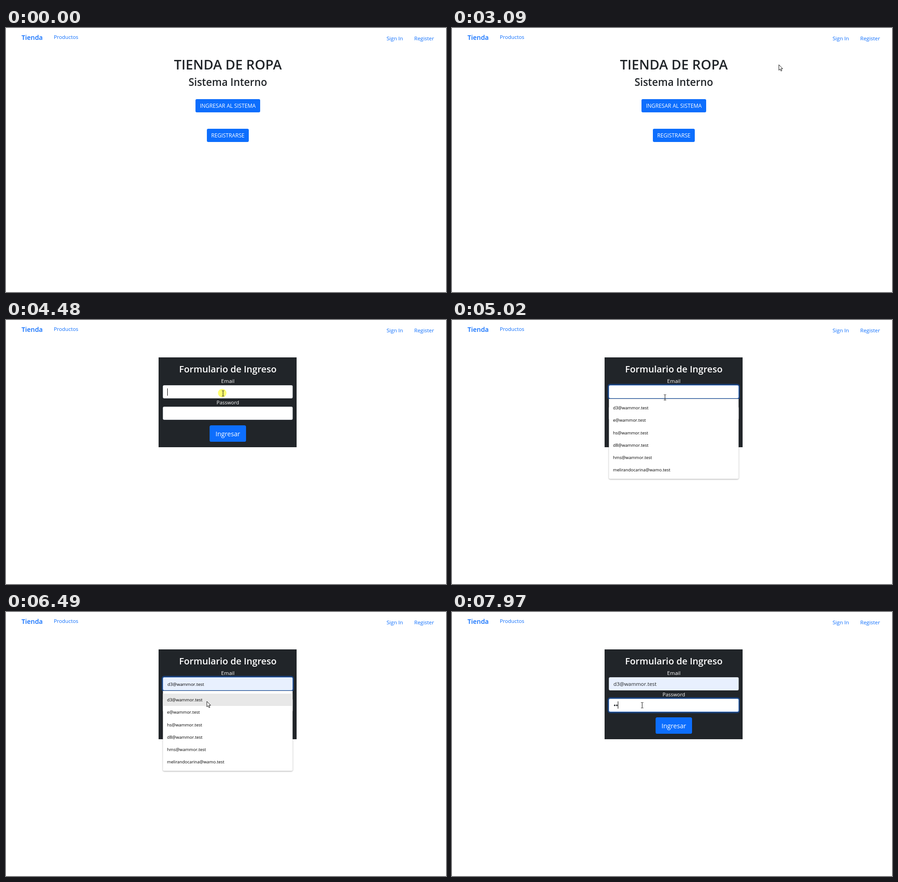
Recreate the animation shown at these times as an HTML page with a canvas. Size 966 by 579 pixels, loop 8 s.

```html
<!DOCTYPE html>
<html lang="es">
<head>
<meta charset="utf-8">
<title>Tienda</title>
<style>
  html, body { margin: 0; width: 100%; height: 100%; overflow: hidden; background: #fff; }
  canvas { display: block; width: 966px; height: 579px; }
</style>
</head>
<body>
<canvas id="stage"></canvas>
<script>
const W = 966, H = 579, LOOP = 8000, STEP = 70;
const BLUE = '#0d6efd', DEEP = '#0a58ca', INK = '#212529';
const USER = 'd3@wammor.test';
const MAILS = [USER, 'e@wammor.test', 'hs@wammor.test', 'd8@wammor.test',
  'hms@wammor.test', 'melirandocarina@wamo.test'];

const canvas = document.getElementById('stage');
const g = canvas.getContext('2d');
const dpr = window.devicePixelRatio || 1;
canvas.width = W * dpr;
canvas.height = H * dpr;

const ARROW = new Path2D('M0 0V12L2.8 9.4L4.6 13.8L6.6 13L4.8 8.7H8.4Z');
const HAND = new Path2D('M-1.7 1.5Q0-.5 1.7 1.5V7Q3 5.8 4.4 7.2Q5.8 6.4 6.8 7.8' +
  'Q8.4 7.5 8.4 9.2L8 13Q7.6 15 6.6 16V17.6H-.6V16L-4.4 11Q-6 8.7-4 8.6Q-2.8 9-1.7 10.4Z');
const KNUCKLES = new Path2D('M1.7 7V9.5M4.4 7.2V9.7M6.8 7.8V10');
const BEAM = new Path2D('M-2.5-6H-.7L0-5.3L.7-6H2.5M0-5.3V5.3M-2.5 6H-.7L0 5.3L.7 6H2.5');

// Pointer moves: start time, number of steps, end x, end y
const START = [906, 482];
const MOVES = [
  [120, 3, 836, 298], [530, 3, 793, 182],
  [1000, 6, 868, 4], [1420, 5, 849, 27], [1820, 1, 853, 27],
  [2950, 8, 492, 170], [3510, 1, 488, 170.5],
  [4060, 6, 476.5, 161], [5020, 4, 441, 196], [6700, 3, 417.5, 204.5]
];

const between = (t, a, b) => t >= a && t < b;

function pointer(t) {
  let [x, y] = START;
  for (const [start, steps, tx, ty] of MOVES) {
    if (t < start) break;
    const p = Math.min(1, (Math.floor((t - start) / STEP) + 1) / steps);
    x += (tx - x) * p;
    y += (ty - y) * p;
  }
  return { x, y };
}

function text(str, x, y, size, color, weight = 400, align = 'left') {
  g.font = `${weight} ${size}px "Open Sans", "Noto Sans", sans-serif`;
  g.textAlign = align;
  g.fillStyle = color;
  g.fillText(str, x, y);
}

function centered(str, y, size, color, weight) {
  text(str, 487, y, size, color, weight, 'center');
}

function box(x, y, w, h, r, color) {
  g.fillStyle = color;
  g.beginPath();
  g.roundRect(x, y, w, h, r);
  g.fill();
}

function caret(x, y) {
  g.fillStyle = '#000';
  g.fillRect(x, y, 1, 16);
}

function nav(hover) {
  text('Tienda', 34, 25.5, 14.3, BLUE, 600);
  text('Productos', 105, 24, 11.35, BLUE);
  text('Sign In', 835.5, 27, 11.6, hover ? DEEP : BLUE);
  text('Register', 896.3, 27, 11.5, BLUE);
}

function home(t, onButton) {
  centered('TIENDA DE ROPA', 91, 29.4, INK, 600);
  centered('Sistema Interno', 127, 22.5, INK, 600);
  const pressed = t >= 3650;
  if (pressed) box(413, 153, 148, 35, 5.5, 'rgba(49,132,253,.5)');
  box(416, 156, 142, 29, 3, pressed ? DEEP : onButton ? '#0b5ed7' : BLUE);
  centered('INGRESAR AL SISTEMA', 175, 11.75, '#fff');
  box(441, 221, 92, 29, 3, BLUE);
  centered('REGISTRARSE', 240, 11.7, '#fff');
}

function field(y, focus, color) {
  if (focus > 0) {
    g.globalAlpha = focus;
    box(341.5, y - 3, 290.5, 35, 6, 'rgba(13,110,253,.35)');
    g.globalAlpha = 1;
  }
  box(344.3, y, 285.2, 29, 3, focus > 0 ? '#86b7fe' : '#ced4da');
  box(345, y + .8, 283.8, 27.4, 2.4, color);
}

// Focus glow rises over two steps
const glow = (t, on, off) => between(t, on, off) ? Math.min(1, (t - on + STEP) / 140) : 0;

function form(t) {
  const preview = between(t, 5160, 6560), filled = t >= 6560;
  g.fillStyle = INK;
  g.fillRect(335, 82, 303, 197);
  centered('Formulario de Ingreso', 115, 20.1, '#fff', 600);
  centered('Email', 138, 11.5, '#fff');
  field(143, glow(t, 4550, 6920), t >= 5160 ? '#e8f0fe' : '#fff');
  centered('Password', 185, 11, '#fff');
  field(190, glow(t, 6920, LOOP), '#fff');
  box(447, 231, 80, 36, 3.6, BLUE);
  centered('Ingresar', 255.3, 14.1, '#fff');

  if (preview) text(USER, 354.5, 162, 9.7, '#000', 500);
  if (filled) text(USER, 354.5, 162, 11.4, INK);
  if (between(t, 4480, 5020) || between(t, 5560, 6090)) caret(354, 150);
  if (between(t, 6560, 6920)) caret(450, 150);

  const typed = (t >= 7710) + (t >= 7970);
  for (let i = 0; i < typed; i++) {
    g.fillStyle = INK;
    g.beginPath();
    g.arc(357.2 + i * 4.6, 204.8, 1.7, 0, 7);
    g.fill();
  }
  if (between(t, 6920, 7450) || typed) caret(354 + typed * 5, 196);
}

function suggestions(t) {
  let alpha = 1, scale = 1;
  if (t < 4620) { alpha = .5; scale = .98; }
  if (t >= 6560) { alpha = .45; scale = .98; }
  if (t >= 6630) { alpha = .08; scale = .956; }
  g.save();
  g.globalAlpha = alpha;
  g.translate(487, 262);
  g.scale(scale, scale);
  g.translate(-487, -262);
  g.shadowColor = 'rgba(0,0,0,.35)';
  g.shadowBlur = 3;
  g.shadowOffsetY = 1;
  box(344.5, 173, 284.7, 175.5, [0, 0, 3, 3], '#fff');
  g.shadowColor = 'transparent';
  if (between(t, 5160, 6630)) {
    g.fillStyle = '#e8e8e8';
    g.fillRect(344.5, 179, 284.7, 27);
  }
  MAILS.forEach((mail, i) => text(mail, 353.5, 196 + i * 27.25, 9.4, '#000', 500));
  g.restore();
}

function status() {
  box(-4, 569.3, 119.7, 20, 3, '#dee1e6');
  text('localhost:4200/login/signin', 1, 581, 8.7, '#4d5566');
}

function drawPointer(t, { x, y }, overLink) {
  const beam = between(t, 3720, 5090) || t >= 6770;
  if (between(t, 4340, 4550) || between(t, 6850, 6990)) {
    g.fillStyle = 'rgba(255,255,50,.7)';
    g.beginPath();
    g.arc(x - 1.8, y - .8, 9.3, 0, 7);
    g.fill();
  }
  g.save();
  g.translate(x, y);
  g.lineJoin = 'round';
  g.lineWidth = 1;
  g.strokeStyle = '#111';
  if (beam) {
    if (t < 3790) g.strokeStyle = '#aaa392';
    g.stroke(BEAM);
  } else {
    const shape = overLink ? HAND : ARROW;
    g.fillStyle = '#fff';
    g.fill(shape);
    g.stroke(shape);
    if (overLink) g.stroke(KNUCKLES);
  }
  g.restore();
}

function draw(t) {
  const p = pointer(t);
  const onNav = t < 3000 && p.x > 823 && p.x < 885 && p.y < 39;
  const onButton = between(t, 3000, 3790) && p.x < 558 && p.y > 156;
  g.setTransform(dpr, 0, 0, dpr, 0, 0);
  g.fillStyle = '#fff';
  g.fillRect(0, 0, W, H);
  nav(onNav);
  if (t < 3790) home(t, onButton);
  else form(t);
  if (between(t, 4550, 6700)) suggestions(t);
  if (between(t, 1350, 3090) || between(t, 3510, 4130)) status();
  if (t >= 120) drawPointer(t, p, onNav || onButton);
}

function tick() {
  draw(performance.now() % LOOP);
  requestAnimationFrame(tick);
}
tick();
</script>
</body>
</html>
```
